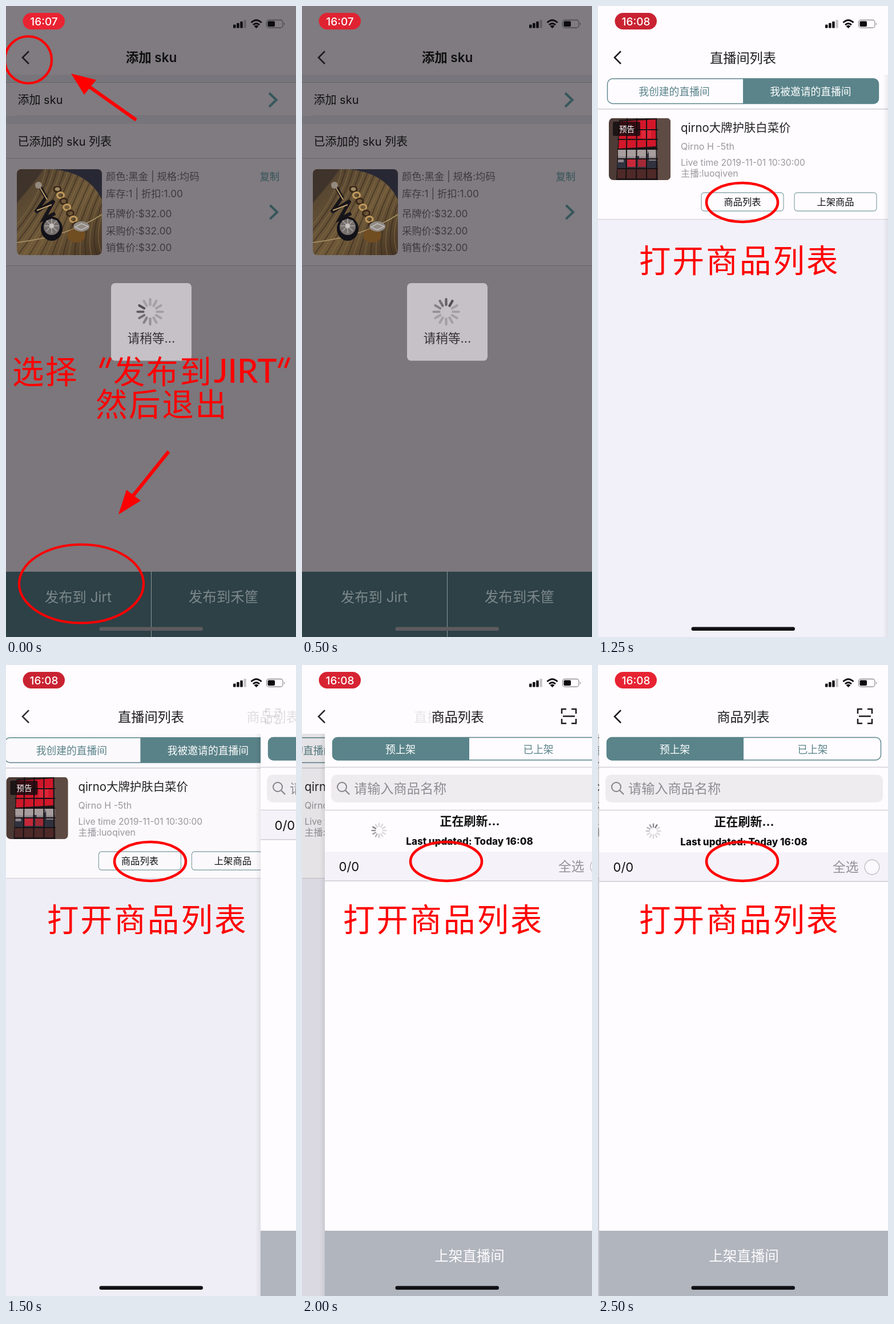
An HTML page that plays this animation: 508 px wide and 1102 px high, repeating every 2750 ms.

```html
<!DOCTYPE html>
<html lang="zh-CN">
<head>
<meta charset="utf-8">
<title>发布商品</title>
<style>
html, body { margin: 0; width: 100%; height: 100%; overflow: hidden; background: #fefcff; }
svg { display: block; width: 100%; height: 100%; }
text { font-family: Inter, "Noto Sans CJK SC", "Noto Sans CJK", sans-serif; white-space: pre; }
.mark text { font-family: "Noto Sans CJK SC", "Noto Sans CJK", sans-serif; }
.mark .word { font-family: Lato, sans-serif; }
</style>
</head>
<body>
<svg id="stage" viewBox="0 0 508 1102"></svg>
<script>
const W = 508, H = 1102, FRAME = 250, COUNT = 11;
const TEAL = '#5a848a', RED = '#ff0000', PAPER = '#fefcff';

// Building blocks; text is placed by its vertical centre.
const text = (x, y, size, str, fill = '#111', weight = 400, anchor = 'start', extra = '') =>
  `<text x="${x}" y="${y + size * 0.37}" font-size="${size}" fill="${fill}" font-weight="${weight}" text-anchor="${anchor}" ${extra}>${str}</text>`;
const mid = (x, y, size, str, fill, weight) => text(x, y, size, str, fill, weight, 'middle');
const rect = (x, y, w, h, fill, r = 0, extra = '') =>
  `<rect x="${x}" y="${y}" width="${w}" height="${h}" rx="${r}" fill="${fill}" ${extra}/>`;
const line = (d, stroke, width, extra = '') =>
  `<path d="${d}" fill="none" stroke="${stroke}" stroke-width="${width}" ${extra}/>`;
const oval = (cx, cy, rx, ry, fill, extra = '') =>
  `<ellipse cx="${cx}" cy="${cy}" rx="${rx}" ry="${ry}" fill="${fill}" ${extra}/>`;
const ring = (cx, cy, rx, ry, w = 4.2) => oval(cx, cy, rx, ry, 'none', `stroke="${RED}" stroke-width="${w}"`);
const group = (id, body, extra = '') => `<g id="${id}" ${extra}>${body}</g>`;
const range = (n, fn) => Array.from({ length: n }, (_, i) => fn(i)).join('');

const spinner = (cls, cx, cy, r1, r2, w, color) =>
  `<g class="${cls}" transform="translate(${cx} ${cy})">` +
  range(12, i => line(`M0 ${-r1}V${-r2}`, color, w, `stroke-linecap="round" transform="rotate(${i * 30})"`)) + '</g>';

const chevron = (x, y) => line(`M${x} ${y - 12}l12.5 12l-12.5 12`, '#35565b', 4);

function earrings() {
  const ridges = range(26, i =>
    line(`M${70 + i * 7} 280Q${62 + i * 4} ${345 + i * 2} ${-30 + i * 10} 436`, i % 2 ? '#30241c' : '#826c49', 1.6, 'opacity=".6"'));
  const links = range(7, i =>
    oval(90 + i * 5.6, 320 + i * 10.5, 6, 5, 'none', `stroke="${i % 2 ? '#c19a5c' : '#3a2718'}" stroke-width="3"`));
  const spokes = range(8, i => line('M80 384v-13', '#aaa29d', 1.6, `transform="rotate(${i * 45} 80 384)"`));
  return '<g clip-path="url(#photo)">' + rect(19, 285, 149, 150, 'url(#gold)') + ridges +
    '<path d="M84 285H168V338Q146 292 84 285Z" fill="#282834"/>' +
    '<path d="M19 285H66Q42 318 19 344Z" fill="#3a302a" opacity=".8"/>' +
    line('M19 413Q110 402 168 364', '#a18a5f', 2) +
    line('M58 313L70 334L52 360L84 340L66 372L86 362', '#17151a', 6) +
    line('M60 318L72 338M54 357L80 347', '#c0a06c', 2) +
    oval(57, 313, 6, 6, '#958a80') + oval(90, 318, 5, 5, '#a18b65') + links +
    oval(80, 389, 19, 21, '#121118') + oval(80, 386, 14, 14, '#756f6e') + spokes + oval(80, 384, 4, 4, '#c9c3c0') +
    oval(123, 401, 16, 12, '#714d22') + oval(132, 385, 14, 9, '#918b86') +
    line('M121 386l11-6l12 5l-12 6z', '#c3bdba', 1.5) + '</g>';
}

function storefront() {
  return '<g clip-path="url(#shop)">' + rect(19, 196, 108, 108, '#4c3b36') +
    '<path d="M102 196H127V304H105Z" fill="#5e4b44"/>' +
    '<path d="M37 199L102 196L105 304H32Z" fill="#1d1718"/>' +
    '<path d="M38 202L102 198L103 245L36 249Z" fill="#d3172a"/>' +
    rect(35, 250, 69, 32, '#8d8389') + rect(35, 250, 69, 13, '#a89e9e') +
    '<path d="M34 283V273H45V266H53V274H66V262H72V275H84V258H87V252L89 258V270H104V283Z" fill="#30333f"/>' +
    rect(51, 266, 15, 15, '#c7283a') + rect(70, 266, 14, 15, '#a32937') +
    rect(34, 283, 71, 18, '#4e2928') +
    rect(76, 214, 17, 17, '#df2638') +
    range(4, i => line(`M${51 + i * 17} 196L${49 + i * 18} 304`, '#171114', 2)) +
    range(5, i => line(`M34 ${216 + i * 17}H105`, '#171114', 1.8)) +
    rect(26, 202, 48, 25, '#120c0e', 3, 'opacity=".82"') + mid(50.5, 215, 13.6, '预告', '#fff') + '</g>';
}

function skuPage() {
  const soft = '#3d3a40', rule = '#67656a', label = '#7d888a';
  const rows = [[298, '颜色:黑金 | 规格:均码'], [328, '库存:1 | 折扣:1.00'], [363, '吊牌价:$32.00'], [393, '采购价:$32.00'], [422, '销售价:$32.00']];
  return rect(0, 0, W, H, '#7b777c') + rect(0, 0, W, 454, '#7f7b80') +
    rect(0, 120, W, 14, '#77757b') + rect(0, 192, W, 14, '#77757b') +
    [133.5, 266, 453.5].map(y => line(`M0 ${y}H508`, rule, 1)).join('') + line('M20 191.5H508', '#727076', 1) +
    mid(254.5, 90, 22.5, '添加 sku', '#111', 600) +
    text(20.5, 164, 20, '添加 sku') + text(20.5, 237, 20, '已添加的 sku 列表') +
    chevron(461, 164) + chevron(462.5, 360) + earrings() +
    rows.map(([y, s]) => text(175, y, 17.3, s, soft)).join('') +
    text(444.5, 298, 17.3, '复制', '#35545a') +
    rect(0, 988, W, 114, '#2d4147') + line('M254.5 988V1102', '#8b9496', 1) +
    mid(126.5, 1032, 24.3, '发布到 Jirt', label) + mid(381, 1032, 24.5, '发布到禾筐', label) +
    rect(184, 484, 141, 135.5, '#c5c1c6', 7) +
    spinner('spin', 252.5, 534, 12, 22, 4.2, '#4b484d') + mid(254.5, 580, 21.6, '请稍等...', '#333135');
}

function roomsPage() {
  const gray = '#9b999d';
  const button = (x, s) => rect(x, 326, 144, 32, PAPER, 5, 'stroke="#8faaae" stroke-width="1.3"') + mid(x + 72, 342, 16.3, s, '#111', 500);
  return rect(0, 0, W, H, '#f2f1f9') + rect(0, 0, W, 372, PAPER) +
    line('M0 180H508', '#cfcdd3', 1.4) + line('M0 372.5H508', '#d0ced5', 1.2) +
    rect(16.5, 127, 475, 43.5, PAPER, 9, `stroke="${TEAL}" stroke-width="1.4"`) +
    `<path d="M254 126.5H483a9 9 0 0 1 9 9V162a9 9 0 0 1-9 9H254Z" fill="${TEAL}"/>` +
    mid(133.5, 149, 17.8, '我创建的直播间', TEAL) + mid(372.5, 149, 17.8, '我被邀请的直播间', '#fff') +
    storefront() + text(145, 212, 20.4, 'qirno大牌护肤白菜价', '#222') +
    text(145, 245, 16, 'Qirno H -5th', gray) + text(145, 273, 15.6, 'Live time 2019-11-01 10:30:00', gray) +
    text(145, 292, 16, '主播:luoqiven', gray) +
    button(181, '商品列表') + button(344, '上架商品');
}

function goodsPage() {
  const feed = rect(0, 327, W, 51, '#f5f2fa') + line('M0 378H508', '#cdcbd1', 1.4) +
    text(24.5, 353, 22, '0/0') + text(409, 353, 22.8, '全选', '#949298') +
    oval(478, 353, 12.8, 12.8, '#fbf9fd', 'stroke="#b9b7bc" stroke-width="1.2"') +
    group('refresh', spinner('spin', 95, 290, 7, 12.3, 2.5, '#77757a') +
      mid(254, 273, 21, '正在刷新...', '#111', 700) + mid(253.5, 309, 17, 'Last updated: Today 16:08', '#111', 800));
  return rect(-9, 120, 9, H, 'url(#shade)') + rect(0, 120, W, H, PAPER) +
    rect(13.5, 126.5, 480, 39.5, PAPER, 9, `stroke="${TEAL}" stroke-width="1.4"`) +
    `<path d="M253 126H22a9 9 0 0 0-9 9V157.5a9 9 0 0 0 9 9H253Z" fill="${TEAL}"/>` +
    mid(132.5, 147, 17.7, '预上架', '#fff') + mid(374, 147, 17.7, '已上架', TEAL) +
    line('M0 178.5H508M0 253.5H508', '#d3d1d6', 1.4) +
    rect(11, 191.5, 486, 48.5, '#efecef', 10) +
    oval(30, 213, 8, 8, 'none', 'stroke="#858388" stroke-width="2"') + line('M36 219l7 7', '#858388', 2.3) +
    text(51, 215.5, 23.2, '请输入商品名称', '#8f8d92') +
    `<g clip-path="url(#feedArea)">${group('feed', feed)}</g>` +
    rect(0, 988, W, 114, '#b1b5bd') + mid(253.5, 1032, 24.5, '上架直播间', '#fdfcff');
}

function navBar() {
  const scan = line('M455 85V77H463M472 77H480V85M480 94V102H472M463 102H455V94M457 89.5H478', '#1c1b1e', 2.5);
  return rect(0, 0, W, 120, PAPER) + group('oldTitle', mid(254, 90, 23.2, '直播间列表', '#1c1b1e', 500)) +
    group('newTitle', mid(253.5, 90, 23, '商品列表', '#1c1b1e', 500)) + group('scan', scan);
}

function statusBar() {
  return '<rect id="pill" x="29.5" y="12" width="73.5" height="29" rx="14.5"/>' +
    '<text id="clock" x="66.5" y="33.5" font-size="19" font-weight="500" fill="#fff" text-anchor="middle"></text>' +
    range(4, i => rect(398 + i * 6.1, 32.5 - i * 2.8, 4.5, 6 + i * 2.8, i < 3 ? '#0c0b0d' : 'rgba(0,0,0,.22)', 1)) +
    line('M429.5 29Q438.5 20.5 447.5 29M433 33Q438.5 28 444 33', '#0c0b0d', 3) +
    '<path d="M434.5 35.2Q438.5 32 442.5 35.2L438.5 39Z" fill="#0c0b0d"/>' +
    rect(456.5, 24.5, 28.5, 13.5, 'none', 4, 'stroke="#000" stroke-opacity=".42" stroke-width="1.3"') +
    rect(458.5, 26.5, 12.5, 9.5, '#0c0b0d', 2) + '<path d="M487 29q2.5 2.2 0 4.8z" fill="#000" opacity=".45"/>';
}

const arrow = (tail, base, head) => line(`M${tail}L${base}`, RED, 6) + `<path d="M${head}Z" fill="${RED}"/>`;
const big = (x, y, s, gap = 2.6) => text(x, y, 55.5, s, RED, 500, 'start', `letter-spacing="${gap}"`);

function publishMarks() {
  return ring(39, 94, 41, 41) + ring(132, 1009, 109, 68.5) +
    arrow('228 199', '146 141', '114 118L158 129L137 155') +
    arrow('285 778', '222 856', '197 888L211 845L236 864') +
    big(11, 638, '选择') + big(188, 638, '发布到') + big(157, 695, '然后退出') +
    `<text class="word" x="364" y="658" font-size="58" font-weight="500" fill="${RED}">JIRT</text>` +
    line('M172 614L165 632M183 614L176 632M485 614L478 632M496 614L489 632', RED, 4.5);
}

const $ = id => document.getElementById(id);
const show = (id, on) => $(id).setAttribute('display', on ? 'inline' : 'none');
const shift = (id, x, y = 0) => $(id).setAttribute('transform', `translate(${x} ${y})`);
const fade = (id, o) => $(id).setAttribute('opacity', Math.max(0, Math.min(1, o)));

$('stage').innerHTML = `<defs>
  <linearGradient id="gold" x2="1" y2="1"><stop stop-color="#4b3c2d"/><stop offset=".55" stop-color="#705a39"/><stop offset="1" stop-color="#443323"/></linearGradient>
  <linearGradient id="shade"><stop stop-opacity="0"/><stop offset="1" stop-opacity=".07"/></linearGradient>
  <clipPath id="photo">${rect(19, 285, 149, 150, '#000', 8)}</clipPath>
  <clipPath id="shop">${rect(19, 195.5, 108.5, 108.5, '#000', 8)}</clipPath>
  <clipPath id="feedArea">${rect(0, 254.3, W, 734, '#000')}</clipPath>
</defs>` +
  group('sku', skuPage()) +
  group('live', group('rooms', roomsPage()) + rect(0, 120, W, H, '#000', 0, 'id="dim"') + group('goods', goodsPage()) + navBar()) +
  group('back', line('M40 79L29 90L40 101', '#1c1b1e', 2.6)) + statusBar() +
  rect(163.5, 1084.5, 181.5, 6.5, '#111', 3.2, 'id="home"') +
  group('publish', publishMarks(), 'class="mark"') +
  group('open', ring(252.5, 343, 62.5, 34, 4.6) + big(72, 444, '打开商品列表', 3.1), 'class="mark"');

// Critically damped push, from off-stage right to rest.
function pushX(t) {
  const u = Math.max(0, 2.4 + 1.8 * (t - 1750) / FRAME);
  return Math.round(W * (1 + u) * Math.exp(-u));
}

function draw(step) {
  const t = step * FRAME, live = t >= 1250;
  const x = pushX(t), left = x / W, p = 1 - left;

  show('sku', !live);
  show('live', live);
  show('publish', t < 500);
  show('open', live);
  $('clock').textContent = live ? '16:08' : '16:07';
  $('pill').setAttribute('fill', `rgb(${Math.round(217 + 17 * Math.cos(2 * Math.PI * step / COUNT))},35,50)`);
  $('home').setAttribute('fill', live ? '#111014' : '#5e5b5f');

  shift('rooms', -0.3 * (W - x));
  shift('goods', x);
  fade('dim', 0.105 * p);
  shift('newTitle', 0.48 * x);
  fade('newTitle', p * 1.1);
  fade('oldTitle', left * 1.3);
  fade('scan', p * 1.1);
  fade('back', live ? 1 - p * left : 1);

  const pull = [-73, -34, -1][step - 6] || 0;
  shift('feed', 0, pull);
  fade('refresh', 1 + pull / 85);

  const head = Math.floor(10.5 + 1.5 * step);
  document.querySelectorAll('.spin').forEach(g => [...g.children].forEach((s, i) => {
    const age = (head - i + 24) % 12;
    s.setAttribute('opacity', Math.max(0.28, 0.95 - age * 0.14));
  }));
}

let last = -1;
const start = performance.now();
function tick() {
  const step = Math.floor((performance.now() - start) / FRAME) % COUNT;
  if (step !== last) draw(last = step);
  requestAnimationFrame(tick);
}
tick();
</script>
</body>
</html>
```
